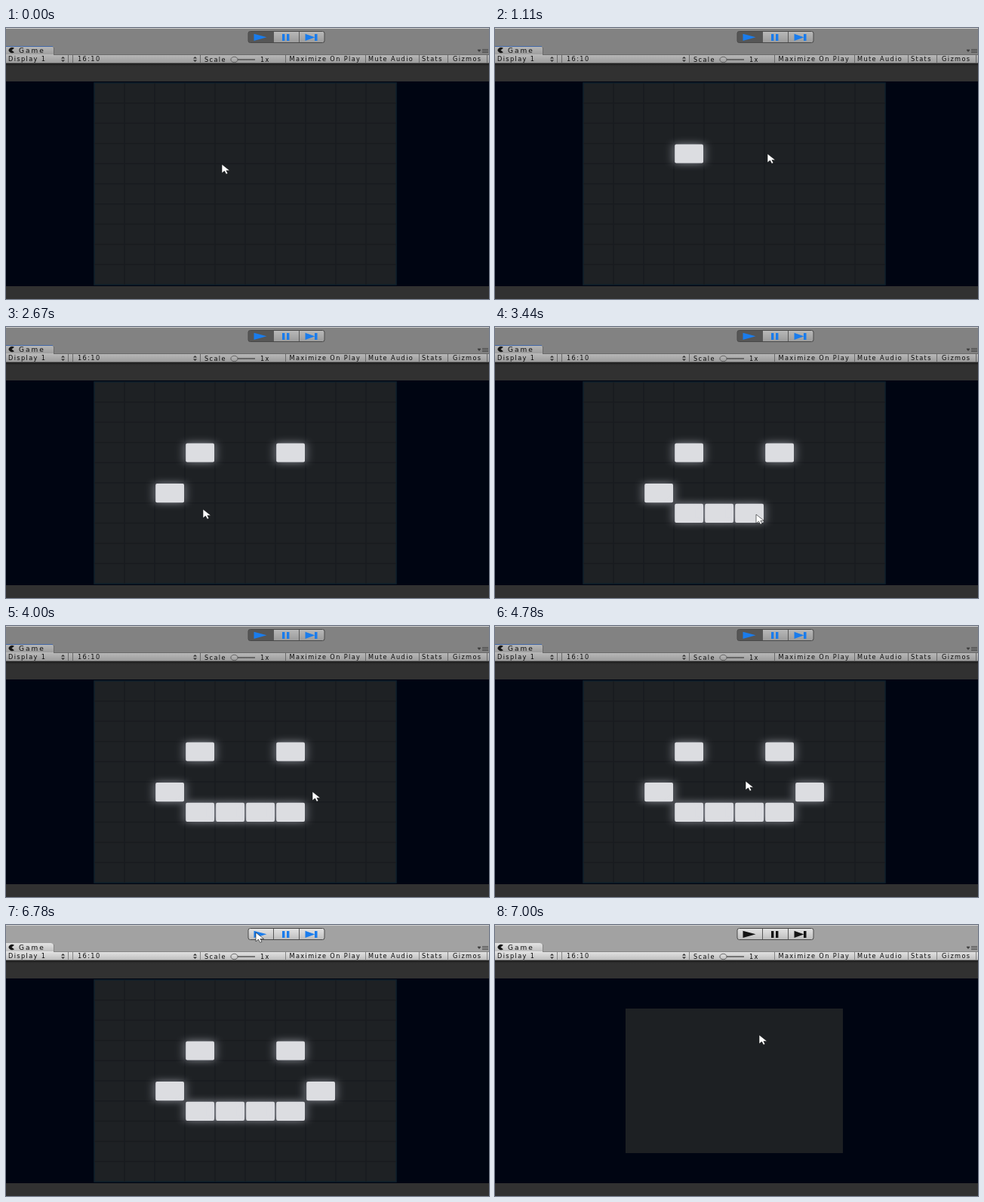
Recreate the animation shown at these times as an HTML page. Size 640 by 360 pixels, loop 7790 ms.

```html
<!DOCTYPE html>
<html lang="en">
<head>
<meta charset="utf-8">
<title>Tile grid in a game view</title>
<style>
  html, body { margin: 0; width: 100%; height: 100%; overflow: hidden; background: #313131; }
  svg {
    display: block; width: 640px; height: 360px;
    --bar: #a2a2a2; --top: #e4e4e4; --bottom: #bdbdbd; --line: #858585;
    --icon: #141414; --play: url(#face);
  }
  .running { --icon: #1a7cec; }
  .tinted { --bar: #828282; --top: #b9b9b9; --bottom: #9b9b9b; --line: #696969; --play: #565656; }
  text { font: 8.2px "DejaVu Sans", sans-serif; letter-spacing: 1.38px; fill: #0c0c0c; }
  .tab { font-size: 9px; letter-spacing: 2px; }
  .bar { fill: var(--bar); }
  .icon { fill: var(--icon); }
  .line { stroke: var(--line); }
  .hidden { display: none; }
</style>
</head>
<body>
<svg id="stage" viewBox="0 0 640 360">
  <defs>
    <linearGradient id="face" x2="0" y2="1">
      <stop style="stop-color: var(--top)"/>
      <stop offset="1" style="stop-color: var(--bottom)"/>
    </linearGradient>
    <linearGradient id="shade" x2="0" y2="1">
      <stop stop-color="#1d1d1d"/>
      <stop offset="1" stop-color="#313131"/>
    </linearGradient>
    <filter id="glow" x="-70%" y="-70%" width="240%" height="240%">
      <feGaussianBlur stdDeviation="6.2 4.8"/>
    </filter>
    <filter id="soft"><feGaussianBlur stdDeviation=".45"/></filter>
    <g id="tile">
      <rect width="40" height="27" fill="#d4d7e2" opacity=".52" filter="url(#glow)"/>
      <rect x="1.2" y="1" width="37.8" height="25.2" rx="2" fill="#dcdde1" filter="url(#soft)"/>
    </g>
    <path id="updown" d="M-2.6-1h5.2L0-3.6zM-2.6 1h5.2L0 3.6z" fill="#333"/>
  </defs>

  <!-- Title bar and tab -->
  <rect class="bar" width="640" height="36"/>
  <rect width="640" height="1" fill="#d0d0d0"/>
  <path d="M0 36V24H59Q62 24 63 27V36z" fill="url(#face)"/>
  <path id="focus" d="M0 24.5H62" stroke="#4268a8"/>
  <path class="line" d="M63.5 26V35"/>
  <path d="M11 26.8A4.4 3.6 0 1 0 11 32.2L7.5 29.5z" fill="#161616"/>
  <text class="tab" x="17" y="32.6">Game</text>
  <path d="M625 29h4l-2 2.5zM631 28.5h8M631 30.5h8M631 32.5h8" stroke="#3c3c3c" stroke-width=".8" fill="#3c3c3c"/>

  <!-- View options -->
  <rect y="35" width="640" height="12" fill="url(#face)"/>
  <path class="line" d="M63 35.5H640M0 46.5H640M82.5 36V47M88.5 36V47M257.5 36V47M370.5 36V47M476.5 36V47M547.5 36V47M585.5 36V47M637.5 36V47"/>
  <text y="44.4">
    <tspan x="3">Display 1</tspan><tspan x="95">16:10</tspan><tspan x="263" dy=".6">Scale</tspan>
    <tspan x="337">1x</tspan><tspan x="375.5" dy="-.6">Maximize On Play</tspan>
    <tspan x="480">Mute Audio</tspan><tspan x="551">Stats</tspan><tspan x="592">Gizmos</tspan>
  </text>
  <use href="#updown" x="75.5" y="41.5"/>
  <use href="#updown" x="250.5" y="41.5"/>
  <path d="M306 42H330" stroke="#454545" stroke-width="1.3"/>
  <ellipse cx="302.5" cy="42" rx="4.6" ry="3.7" fill="url(#face)" stroke="#555" stroke-width=".9"/>

  <!-- Play, pause, step -->
  <rect x="321" y="4.5" width="101" height="15" rx="2.5" fill="url(#face)"/>
  <path d="M354.5 4.5H323.5Q321 4.5 321 7V17Q321 19.5 323.5 19.5H354.5z" style="fill: var(--play)"/>
  <rect x="321" y="4.5" width="101" height="15" rx="2.5" fill="none" stroke="#484848"/>
  <path d="M354.5 5V19M388.5 5V19" stroke="#585858"/>
  <path class="icon" d="M328.5 7.7L345.5 12.3L328.5 17zM366 8h3.4v9H366zM372 8h3.4v9H372zM396.5 7.7L409 12.2V8H412.5V17H409V12.5L396.5 17z"/>

  <!-- Game view -->
  <rect y="47" width="640" height="24" fill="#313131"/>
  <rect y="47" width="640" height="4" fill="url(#shade)"/>
  <rect y="71" width="640" height="272" fill="#000512"/>
  <g id="board">
    <rect x="117" y="73" width="400" height="268" fill="#1e2124" stroke="#10202b" stroke-width="1.6"/>
    <path id="grid" stroke="#181b1f" stroke-width="1.5"/>
    <g id="tiles"></g>
  </g>
  <rect id="preview" x="173" y="111" width="288" height="192" fill="#1d2023"/>
  <path id="cursor" d="M0 0V11.8L3.5 9.1L5.7 13.2L8 12.3L5.9 8.4H10.6z" fill="#fff" stroke="#101214" stroke-width=".6"/>
</svg>

<script>
const LOOP = 7790, FPS = 9;
const CELLS = 10, CELL_W = 40, CELL_H = 26.8, LEFT = 117, TOP = 73;
const TAB_BLURRED = 60, TINT_OFF = 61, STOPPED = 63;

const byId = id => document.getElementById(id);

let lines = "";
for (let i = 1; i < CELLS; i++) {
  lines += `M${LEFT + i * CELL_W} ${TOP}v${CELLS * CELL_H}M${LEFT} ${TOP + i * CELL_H}h${CELLS * CELL_W}`;
}
byId("grid").setAttribute("d", lines);

// The pointer rests at each stop from `arrive` to `leave`, counted in steps.
const stops = [], tiles = [];

function rest(x, y, arrive, leave = arrive) {
  stops.push({ x, y, arrive, leave });
}

// A click lights the cell under the pointer as it leaves.
function click(x, y, arrive, leave) {
  rest(x, y, arrive, leave);
  const node = document.createElementNS("http://www.w3.org/2000/svg", "use");
  node.setAttribute("href", "#tile");
  node.setAttribute("x", LEFT + Math.floor((x - LEFT) / CELL_W) * CELL_W);
  node.setAttribute("y", TOP + Math.floor((y - TOP) / CELL_H) * CELL_H);
  byId("tiles").append(node);
  tiles.push({ node, step: leave });
}

rest(286, 181, 0);
click(251, 168, 4, 6);      // eyes
rest(361, 167, 8, 10);
click(384, 167, 13, 15);
click(200, 219, 20, 22);    // mouth
click(261, 242, 24, 25);
click(315, 250, 28, 28);
click(346, 249, 29, 31);
click(377, 247, 34, 34);
click(406, 220, 36, 38);
rest(318, 244, 40);
rest(332, 206, 41, 45);
rest(335, 185, 49, 53);
rest(372, 120, 56);
rest(331, 10, 61);          // play button
rest(350, 146, STOPPED, Infinity);

function pointerAt(step) {
  const next = stops.findIndex(stop => step <= stop.leave);
  const to = stops[next];
  if (step >= to.arrive) return [to.x, to.y];
  const from = stops[next - 1];
  const k = (step - from.leave) / (to.arrive - from.leave);
  return [from.x + (to.x - from.x) * k, from.y + (to.y - from.y) * k];
}

const show = (node, visible) => node.classList.toggle("hidden", !visible);

function draw(time) {
  const step = Math.floor((time % LOOP + 5) * FPS / 1000);
  const running = step < STOPPED;
  byId("stage").classList.toggle("running", running);
  byId("stage").classList.toggle("tinted", step < TINT_OFF);
  show(byId("focus"), step < TAB_BLURRED);
  show(byId("board"), running);
  show(byId("preview"), !running);
  for (const tile of tiles) show(tile.node, step >= tile.step);
  byId("cursor").setAttribute("transform", `translate(${pointerAt(step)})`);
}

let start;
function tick(now) {
  start ??= now;
  draw(now - start);
  requestAnimationFrame(tick);
}
draw(0);
requestAnimationFrame(tick);
</script>
</body>
</html>
```
